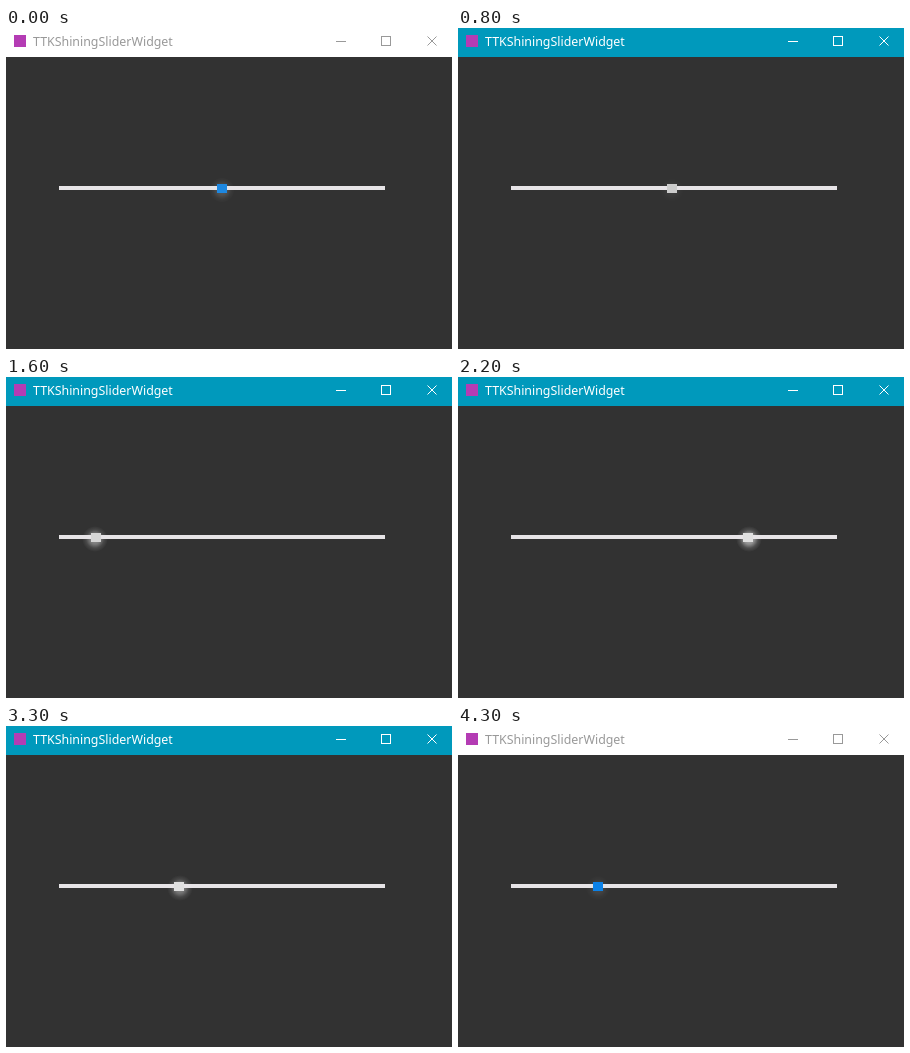
These frames come from a looping animation (446x321 px, 4400 ms). An HTML page:

```html
<!DOCTYPE html>
<html lang="en">
<head>
<meta charset="utf-8">
<title>TTKShiningSliderWidget</title>
<style>
  html, body { margin: 0; width: 100%; height: 100%; overflow: hidden; background: #323232; }
  svg { display: block; width: 446px; height: 321px; }
  text { font: 12.4px "Noto Sans", "Open Sans", sans-serif; fill: currentColor; }

  .title, .bar, .handle, .glow, .thumb { animation: 4.4s step-end infinite; }
  .title { animation-name: caption; }
  .bar { animation-name: bar; }
  .thumb { animation-name: drag; }
  .handle { animation-name: tint; }
  .glow { animation-name: shine; }
  .buttons { fill: none; stroke: currentColor; }

  /* The window is active from 0.8 s to 4.3 s. */
  @keyframes caption {
    0%, 97.72%, 100% { color: #999; }
    18.18% { color: #fff; }
  }
  @keyframes bar {
    0%, 97.72%, 100% { fill: #fff; }
    18.18% { fill: #0099bc; }
  }

  /* The display refreshes ten times a second. */
  @keyframes drag {
    0% { transform: translateX(211px); }
    18.18% { transform: translateX(209px); }
    20.45% { transform: translateX(196px); animation-timing-function: steps(3); }
    27.27% { transform: translateX(106px); }
    29.54% { transform: translateX(72px); }
    31.81% { transform: translateX(70px); }
    36.36% { transform: translateX(85px); }
    38.63% { transform: translateX(115px); animation-timing-function: steps(2); }
    43.18% { transform: translateX(199px); animation-timing-function: steps(2); }
    47.72% { transform: translateX(265px); }
    49.99% { transform: translateX(285px); animation-timing-function: steps(3); }
    56.81% { transform: translateX(351px); }
    59.09% { transform: translateX(347px); }
    61.36% { transform: translateX(331px); }
    63.63% { transform: translateX(293px); animation-timing-function: steps(5); }
    74.99% { transform: translateX(168px); animation-timing-function: steps(3); }
    81.81%, 100% { transform: translateX(135px); }
  }

  /* Normal, hovered, pressed, released. */
  @keyframes tint {
    0% { fill: #1e88e1; }
    4.54% { fill: #1e88e1; animation-timing-function: steps(4); }
    13.63% { fill: #1f1f1f; }
    18.18% { fill: #ccc; animation-timing-function: steps(8); }
    36.36% { fill: #d6d6d6; animation-timing-function: steps(6); }
    49.99% { fill: #e0e0e0; }
    81.81% { fill: #1e88e5; }
    97.72%, 100% { fill: #0c82e8; }
  }

  /* The halo trails slightly behind the handle. */
  @keyframes shine {
    0% { opacity: .2; transform: none; }
    18.18% { opacity: .07; transform: none; animation-timing-function: steps(6); }
    31.81% { opacity: .22; transform: none; }
    36.36% { opacity: .5; transform: translateX(-1px); animation-timing-function: steps(6); }
    49.99% { opacity: .65; transform: translateX(1px); animation-timing-function: steps(6); }
    63.63% { opacity: .65; transform: translateX(2px); animation-timing-function: steps(5); }
    74.99% { opacity: .45; transform: translateX(1px); animation-timing-function: steps(3); }
    81.81% { opacity: .17; transform: none; }
    97.72%, 100% { opacity: .12; transform: none; }
  }
</style>
</head>
<body>
<svg viewBox="0 0 446 321">
  <defs>
    <radialGradient id="halo">
      <stop offset="0" stop-color="#fff"/>
      <stop offset=".4" stop-color="#fff" stop-opacity=".7"/>
      <stop offset=".7" stop-color="#fff" stop-opacity=".22"/>
      <stop offset="1" stop-color="#fff" stop-opacity="0"/>
    </radialGradient>
  </defs>

  <rect width="446" height="321" fill="#323232"/>
  <rect class="bar" width="446" height="29"/>
  <g class="title">
    <rect x="8" y="7" width="12" height="12" fill="#b43cb4"/>
    <text x="27" y="18">TTKShiningSliderWidget</text>
    <g class="buttons">
      <path d="M330 13.5h10M375.5 8.5h9v9h-9z" shape-rendering="crispEdges"/>
      <path d="M421.5 8.5l9 9m0-9l-9 9"/>
    </g>
  </g>

  <g class="thumb">
    <circle class="glow" cx="5" cy="162" r="13" fill="url(#halo)"/>
  </g>
  <rect x="53" y="158" width="326" height="4" fill="#e7e4e7"/>
  <g class="thumb">
    <rect class="handle" y="156" width="10" height="9"/>
  </g>
</svg>
</body>
</html>
```
